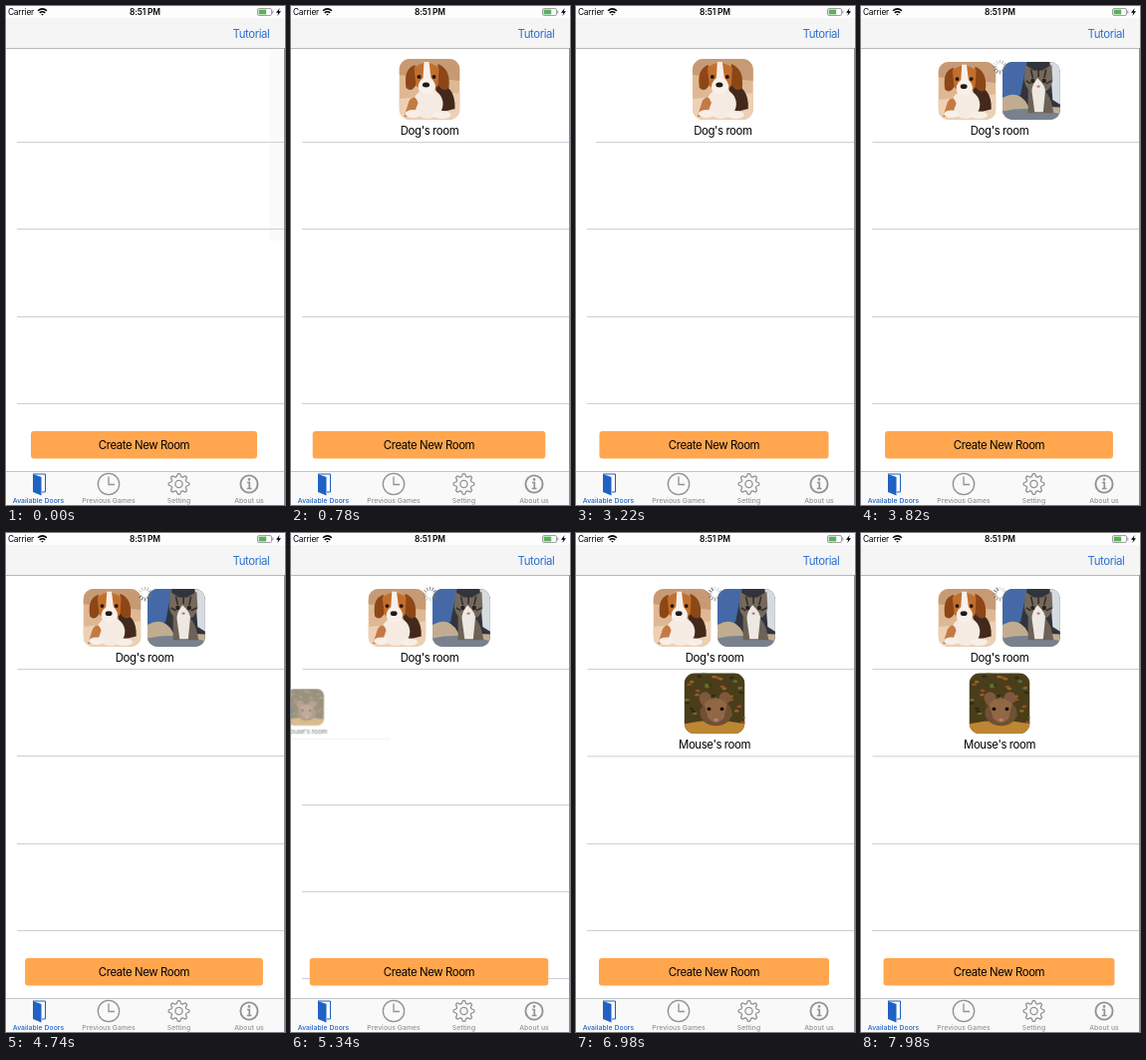
An HTML page for the animation above (8000 ms loop, 280 by 500 pixels).

```html
<!DOCTYPE html>
<html lang="en">
<head>
<meta charset="utf-8">
<title>Available doors</title>
<style>
  html, body { margin: 0; width: 100%; height: 100%; overflow: hidden; background: #fff; }
  svg { display: block; width: 100%; height: 100%; }
  text { font: 11.4px Inter, "Liberation Sans", sans-serif; letter-spacing: -.035em; text-anchor: middle; }
  .status { font-size: 8.4px; letter-spacing: -.02em; }
  .tab { font-size: 6.8px; font-weight: 500; letter-spacing: .01em; fill: #929292; }
  .tab.on { fill: #1f62c4; }
  .rule { stroke: #cfced2; }
  .icon { fill: none; stroke: #929292; }
</style>
</head>
<body>
<svg viewBox="0 0 280 500">
  <defs>
    <clipPath id="round"><rect width="61" height="61" rx="11"/></clipPath>

    <g id="dogPhoto" clip-path="url(#round)">
      <rect width="61" height="61" fill="#dfb893"/>
      <path d="M0 0H61V22L0 16Z" fill="#c79a74"/>
      <path d="M0 40L61 34V61H0Z" fill="#ecd0b4"/>
      <path d="M36 24Q57 26 56 50L40 54Z" fill="#43291c"/>
      <ellipse cx="29" cy="45" rx="15" ry="15" fill="#f5ebe2"/>
      <path d="M10 42Q16 34 19 44L14 58H5Z" fill="#c47a42"/>
      <ellipse cx="14" cy="55" rx="8" ry="4" fill="#f7efe8"/>
      <ellipse cx="43" cy="56" rx="9" ry="4" fill="#f7efe8"/>
      <path d="M16 6Q4 10 7 29Q13 35 18 24Z" fill="#8d4717"/>
      <path d="M39 5Q52 10 50 29Q44 35 38 24Z" fill="#8d4717"/>
      <path d="M15 9Q27-1 40 9L39 27Q28 38 17 27Z" fill="#c26f2e"/>
      <path d="M25 3H30L32 19Q39 26 35 32Q28 38 20 32Q17 25 24 19Z" fill="#f8f0e9"/>
      <circle cx="20" cy="18" r="2" fill="#25160f"/>
      <circle cx="35" cy="18" r="2" fill="#25160f"/>
      <ellipse cx="27" cy="26" rx="3.6" ry="2.5" fill="#201917"/>
    </g>

    <g id="catPhoto" clip-path="url(#round)">
      <rect width="61" height="61" fill="#31343c"/>
      <path d="M0 0H26L19 35L0 40Z" fill="#4469a6"/>
      <path d="M50 0H61V45L53 40Z" fill="#d6dbe0"/>
      <path d="M0 38Q18 28 27 46L61 48V61H0Z" fill="#c0ad91"/>
      <path d="M0 52Q30 46 61 55V61H0Z" fill="#78818d"/>
      <path d="M27 27Q49 20 54 54H27Z" fill="#6d6257"/>
      <path d="M23 20L24 3L33 9H42L52 3L53 20Q51 32 38 33Q25 32 23 20Z" fill="#75695d"/>
      <path d="M30 8L32 17M38 8V16M46 8L44 17M25 20L30 23M52 20L46 23" stroke="#332d29" stroke-width="1.7"/>
      <path d="M37 17Q47 26 45 33L43 53H34L31 31Q31 24 37 17Z" fill="#eee8e2"/>
      <circle cx="32" cy="20" r="2.3" fill="#232520"/>
      <circle cx="44" cy="20" r="2.3" fill="#232520"/>
      <ellipse cx="38" cy="26" rx="1.8" ry="1.2" fill="#b97974"/>
    </g>

    <g id="mousePhoto" clip-path="url(#round)">
      <rect width="61" height="61" fill="#4a3d1a"/>
      <g id="leaves"></g>
      <path d="M0 51Q30 44 61 51V61H0Z" fill="#bd8633"/>
      <ellipse cx="32" cy="40" rx="16" ry="13" fill="#705034"/>
      <circle cx="21" cy="25" r="6" fill="#80583d"/>
      <circle cx="41" cy="25" r="6" fill="#80583d"/>
      <path d="M20 31Q31 19 43 31L40 45Q32 54 24 45Z" fill="#916744"/>
      <circle cx="25" cy="36" r="1.9" fill="#17120f"/>
      <circle cx="38" cy="36" r="1.9" fill="#17120f"/>
      <ellipse cx="32" cy="47" rx="2.3" ry="1.6" fill="#b78470"/>
    </g>
  </defs>

  <rect width="280" height="500" fill="#fff"/>
  <rect id="edgeShade" x="265" y="42" width="14" height="193" fill="#fafafa"/>
  <g id="rules"></g>

  <!-- Cells are drawn around their own centre. -->
  <g id="dogCell">
    <use href="#dogPhoto" x="-31.5" y="-40"/>
    <text x="-1" y="35.5">Dog's room</text>
    <path class="rule" d="M-128.5 43.5H140"/>
  </g>
  <g id="pairCell">
    <use href="#dogPhoto" transform="translate(-62.5 -37) scale(.95)"/>
    <use href="#catPhoto" transform="translate(2 -37) scale(.95)"/>
    <g id="spinner" transform="translate(-.5 -32)" stroke="#777" stroke-width="1.2" stroke-linecap="round"></g>
    <text x="-1" y="35.5">Dog's room</text>
    <path class="rule" d="M-128.5 43.5H140"/>
  </g>
  <g id="mouseCell">
    <use href="#mousePhoto" x="-31.5" y="-40"/>
    <text x="-1" y="35.5">Mouse's room</text>
    <path class="rule" d="M-128.5 43.5H140"/>
  </g>

  <rect id="button" y="426" height="27.5" rx="3" fill="#ffa64e"/>
  <text x="138.5" y="444">Create New Room</text>

  <rect width="280" height="12" fill="#fdfdfd"/>
  <rect y="12" width="280" height="30" fill="#f5f5f5"/>
  <path d="M0 42.5H280" stroke="#b9b9b9"/>
  <text class="status" x="15" y="9">Carrier</text>
  <g fill="none" stroke="#000" stroke-width="1.5">
    <path d="M32 4.8Q36.5.9 41 4.8M33.7 6.9Q36.5 4.5 39.3 6.9"/>
    <path d="M35.2 8L36.5 9.5L37.8 8Z" stroke="none" fill="#000"/>
  </g>
  <text class="status" x="139.5" y="9" font-weight="600" style="font-weight:600">8:51 PM</text>
  <rect x="252.5" y="2.5" width="14" height="7" rx="1.5" fill="none" stroke="#8b8b8b" stroke-width=".8"/>
  <rect x="253.7" y="3.6" width="7.5" height="4.8" fill="#56b35c"/>
  <path d="M267.8 4.6V7.4" stroke="#8b8b8b"/>
  <path d="M274.7 2L271 6.7H273.3L272.3 10L276 5.3H273.7Z"/>
  <text x="246" y="31.5" fill="#2b6fd2">Tutorial</text>

  <rect y="466" width="280" height="34" fill="#f9f9f9"/>
  <path d="M0 466.5H280" stroke="#c4c4c4"/>
  <path d="M27 469H39.5V487H36" fill="none" stroke="#1f62c4"/>
  <path d="M27 469L35.5 472V490.5L27 487Z" fill="#1f62c4"/>
  <g class="icon" stroke-width="1.3">
    <circle cx="103" cy="479" r="10.7"/>
    <path d="M103 471.5V479.5H109"/>
    <path id="gear" stroke-linejoin="round"/>
    <circle cx="173.5" cy="479" r="3.6"/>
    <circle cx="244" cy="479" r="8.6" stroke-width="1.9"/>
    <path d="M242 477.5H244.3V483.5M241.8 483.5H246.5" stroke-width="1.7"/>
    <circle cx="244" cy="474.4" r="1.3" fill="#929292" stroke="none"/>
  </g>
  <text class="tab on" x="32.5" y="497.5">Available Doors</text>
  <text class="tab" x="103" y="497.5">Previous Games</text>
  <text class="tab" x="173.5" y="497.5">Setting</text>
  <text class="tab" x="244" y="497.5">About us</text>
  <path d="M279.5 42V500" stroke="#8c8c8c"/>
</svg>

<script>
const LOOP = 8000, SLIDE = 300, PULSE = 624;
const DOG_IN = 300, PAIR_IN = 3190, MOUSE_IN = 5180;
const WIDTH = 280, ROW = 87.3, FIRST_RULE = 136.5;
const $ = id => document.getElementById(id);

function add(parent, tag, attrs) {
  const el = document.createElementNS("http://www.w3.org/2000/svg", tag);
  for (const key in attrs) el.setAttribute(key, attrs[key]);
  return parent.appendChild(el);
}

const rules = Array.from({ length: 4 }, () =>
  add($("rules"), "path", { class: "rule", d: "M11 0H280" }));

const spokes = Array.from({ length: 12 }, (_, i) =>
  add($("spinner"), "path", { d: "M0-4V-6.8", transform: `rotate(${i * 30})` }));

const leafColors = ["#8b6a24", "#61702a", "#9b4c25", "#2e2c15"];
for (let i = 0; i < 44; i++) {
  add($("leaves"), "ellipse", {
    cx: i * 23.7 % 61, cy: i * 13.3 % 48, rx: 2.4, ry: 1.3,
    transform: `rotate(${i % 5 * 4 - 8} 30 25)`, fill: leafColors[i % 4]
  });
}

const gearPoints = Array.from({ length: 32 }, (_, i) => {
  const angle = (i - .5) * Math.PI / 16;
  const radius = i % 4 < 2 ? 10.4 : 7.8;
  return `${173.5 + radius * Math.sin(angle)} ${479 - radius * Math.cos(angle)}`;
});
$("gear").setAttribute("d", `M${gearPoints.join("L")}Z`);

function progress(t, start) {
  const u = Math.min(1, Math.max(0, (t - start) / SLIDE));
  return u * u * (3 - 2 * u);
}

function placeCell(id, row, p, exit = 0) {
  const x = WIDTH / 2 + WIDTH * (p - 1 + exit);
  const y = FIRST_RULE - 43.5 + row * ROW;
  const cell = $(id);
  cell.setAttribute("transform", `translate(${x} ${y}) scale(${.1 + .9 * p})`);
  cell.setAttribute("opacity", p);
  cell.style.display = p > 0 && exit < 1 ? "" : "none";
}

function draw(now) {
  const t = now % LOOP;
  const dog = progress(t, DOG_IN);
  const pair = progress(t, PAIR_IN);
  const mouse = progress(t, MOUSE_IN);

  placeCell("dogCell", 0, dog, pair);
  placeCell("pairCell", 0, pair);
  placeCell("mouseCell", 1, mouse);
  $("edgeShade").style.display = t < DOG_IN ? "" : "none";

  // Each new row pushes the empty rows beneath it down.
  rules.forEach((rule, i) => {
    const y = Math.round(FIRST_RULE + ROW * (i + dog + mouse) - .5) + .5;
    rule.setAttribute("transform", `translate(0 ${y})`);
  });

  const grow = 3.25 * (1 - Math.cos(2 * Math.PI * t / PULSE));
  $("button").setAttribute("x", 25 - grow);
  $("button").setAttribute("width", 227 + 2 * grow);

  const head = Math.floor(t / 1000 * 12);
  spokes.forEach((spoke, i) =>
    spoke.setAttribute("opacity", 1 - .07 * ((head - i + 120) % 12)));

  requestAnimationFrame(() => draw(performance.now()));
}
draw(0);
</script>
</body>
</html>
```
